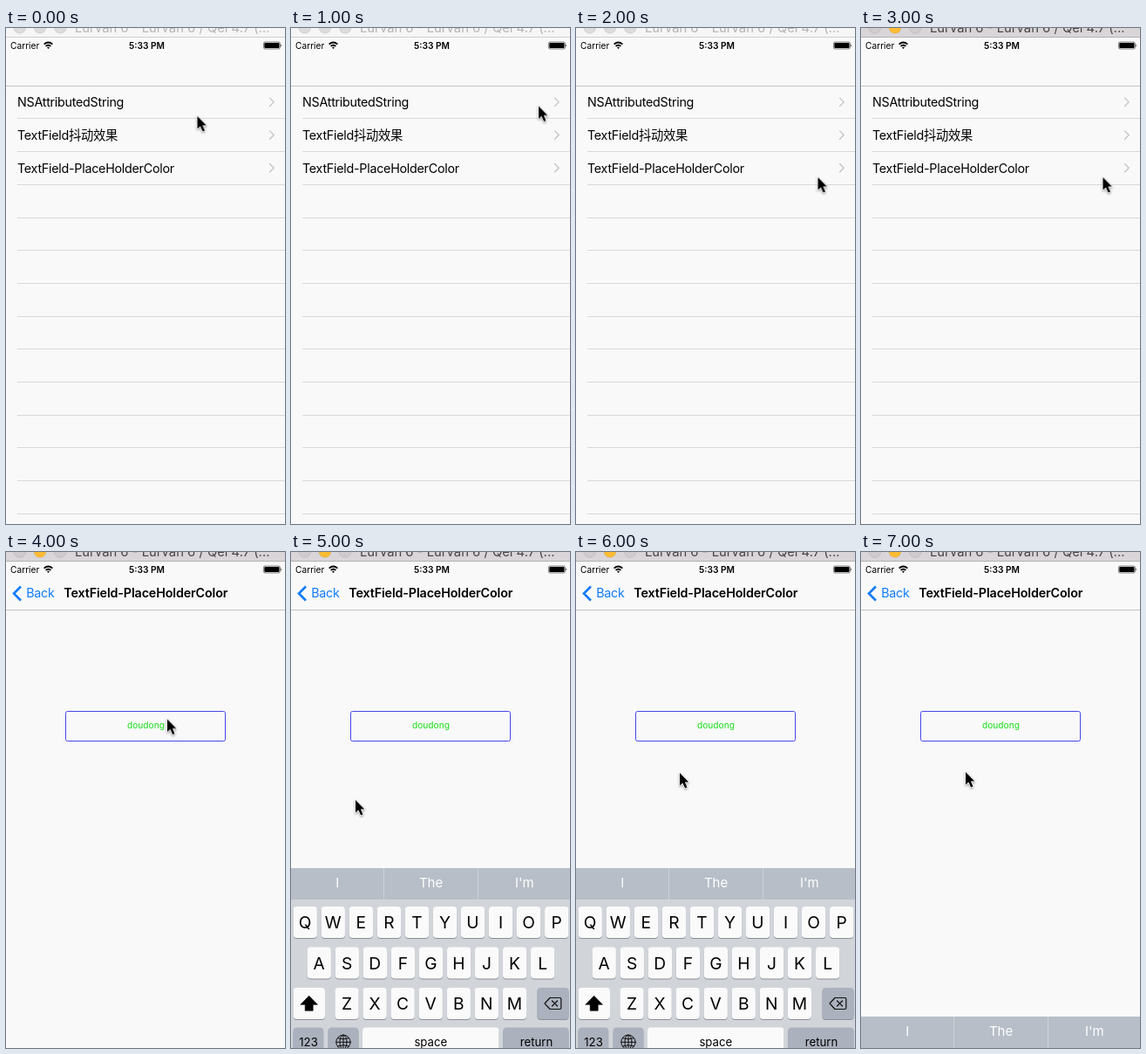
An HTML page for the animation above (8000 ms loop, 320 by 568 pixels).

```html
<!DOCTYPE html>
<html lang="en">
<head>
<meta charset="utf-8">
<title>Text field demo</title>
<style>
  html, body { margin: 0; width: 100%; height: 100%; overflow: hidden; background: #f9f9f9; }
  svg { display: block; width: 320px; height: 568px; }
  text { font: 14.3px Inter, "Noto Sans CJK SC", "Noto Sans CJK", sans-serif; letter-spacing: -.26px; }
  .mid { text-anchor: middle; }
  .small { font-size: 10.2px; letter-spacing: 0; }
  .bold { font-weight: 600; }
  .heading { letter-spacing: -.13px; }
  .caption { font-size: 14.8px; letter-spacing: 0; }
  .letter { font-size: 19.2px; letter-spacing: 0; }
  .label { font-size: 13.2px; letter-spacing: 0; }
  .hint { font-size: 15px; letter-spacing: 0; fill: #fff; }
  .line { fill: none; stroke-linecap: round; stroke-linejoin: round; }

  #list, #page, #idle, #active, #keys, #pointer { animation: 8s step-end infinite; }
  #list { animation-name: until-push; }
  #page { animation-name: after-push; }
  #idle { animation-name: until-focus; }
  #active { animation-name: after-focus; }
  #keys { animation-name: keyboard; }
  #pointer { animation-name: point; filter: drop-shadow(.5px 1.5px 1px #0006); }

  @keyframes until-push { 0% { visibility: visible; } 50%, 100% { visibility: hidden; } }
  @keyframes after-push { 0% { visibility: hidden; } 50%, 100% { visibility: visible; } }
  @keyframes until-focus { 0% { visibility: visible; } 37.5%, 100% { visibility: hidden; } }
  @keyframes after-focus { 0% { visibility: hidden; } 37.5%, 100% { visibility: visible; } }
  @keyframes keyboard {
    0% { transform: translateY(210px); }
    62.5% { transform: none; }
    87.5%, 100% { transform: translateY(170px); }
  }
  @keyframes point {
    0% { transform: translate(219.5px, 101px); }
    12.5% { transform: translate(284px, 89.5px); }
    25%, 37.5% { transform: translate(277.5px, 171px); }
    50% { transform: translate(185px, 191.5px); }
    62.5% { transform: translate(74px, 284px); }
    75% { transform: translate(119px, 253px); }
    87.5%, 100% { transform: translate(120px, 252px); }
  }
</style>
</head>
<body>
<svg viewBox="0 0 320 568">
  <rect width="320" height="568" fill="#f9f9f9"/>

  <g id="list"></g>

  <g id="page">
    <path class="line" d="M17 39.5 9 47.5 17 55.5" stroke="#107bfa" stroke-width="2.6" style="stroke-linecap:butt;stroke-linejoin:miter"/>
    <text x="23.2" y="52.3" fill="#107bfa">Back</text>
    <text class="mid bold heading" x="160.3" y="52.3">TextField-PlaceHolderColor</text>
    <rect x="68.5" y="182.5" width="183" height="34" rx="2" fill="#f9f9f9" stroke="#4646ea"/>
    <text class="mid small" x="160.5" y="202" fill="#18dc18">doudong</text>
  </g>

  <path d="M0 66.5H320" stroke="#c4c4c4"/>

  <text class="small" x="5" y="23.8">Carrier</text>
  <g class="line" stroke="#000" stroke-width="1.7" style="stroke-linecap:butt">
    <path d="M43.6 18.6Q48.5 14.4 53.4 18.6M45.6 20.9Q48.5 18.6 51.4 20.9"/>
    <path d="M48.5 24 47 22.3Q48.5 21 50 22.3Z" fill="#000" stroke="none"/>
  </g>
  <text class="mid small bold" x="161.5" y="23.8">5:33 PM</text>
  <rect x="295.4" y="16" width="19" height="8" rx="1.8" fill="none" stroke="#000" stroke-width=".5"/>
  <rect x="296.3" y="16.9" width="17.2" height="6.2" rx="1"/>
  <path d="M315.3 18.5Q317 20 315.3 21.5Z"/>

  <g id="idle"></g>
  <g id="active"></g>
  <g id="keys"></g>

  <g id="pointer">
    <path d="M0 0V14.6L3.4 11.5 6.1 17.6 8.5 16.6 5.9 10.6H10.3Z" stroke="#fff" stroke-width="1.6" stroke-linejoin="round" paint-order="stroke"/>
  </g>
</svg>
<script>
  const fill = (id, parts) => { document.getElementById(id).innerHTML = parts.join(""); };
  const text = (s, x, y, cls, extra = "") => `<text class="${cls}" x="${x}" y="${y}" ${extra}>${s}</text>`;
  const range = n => [...Array(n).keys()];

  // Table rows
  const rowY = i => 66.25 + 37.69 * i;
  fill("list", [
    ...range(13).map(i => `<path d="M13 ${Math.floor(rowY(i + 1)) + .5}H320" stroke="#d9d9d9"/>`),
    ...["NSAttributedString", "TextField抖动效果", "TextField-PlaceHolderColor"].map((s, i) => {
      const y = rowY(i) + 18.4;
      return text(s, 13, y + 5.6, "") +
        `<path class="line" d="M302.5 ${y - 4.5}l4.7 4.7-4.7 4.7" stroke="#c3c3c7" stroke-width="1.3"/>`;
    })
  ]);

  // Window title bar, unfocused and focused
  const titleBar = (back, edge, ink, dots) => [
    `<rect width="320" height="10.5" fill="${back}"/><path d="M0 10.5H320" stroke="${edge}"/>`,
    ...dots.map((c, i) => `<circle cx="${15.8 + 23.2 * i}" cy="-.8" r="7" fill="${c}" stroke="#0002" stroke-width=".6"/>`),
    text("Lurvan 6 - Lurvan 6 / Qel 4.7 (...", 79, 4.8, "caption", `fill="${ink}"`)
  ];
  fill("idle", titleBar("#f6f6f6", "#d0d0d0", "#b5b5b5", ["#dcdcdc", "#dcdcdc", "#dcdcdc"]));
  fill("active", titleBar("#d9d5d9", "#b3b0b3", "#474547", ["#cfcbcf", "#fdbc32", "#cfcbcf"]));

  // Keyboard
  const key = (x, y, w, color = "#fafafa") =>
    `<rect x="${x}" y="${y + 1}" width="${w}" height="36" rx="4" fill="#8b9097"/>` +
    `<rect x="${x}" y="${y}" width="${w}" height="36" rx="4" fill="${color}"/>`;
  const gray = "#abb1bd";
  const letters = (s, x0, y) => [...s].map((c, i) => {
    const x = x0 + 32.05 * i;
    return key(x, y, 27.3) + text(c, x + 13.6, y + 25.2, "letter mid");
  });
  fill("keys", [
    `<rect y="362" width="320" height="36" fill="#b7bec7"/>`,
    `<rect y="398" width="320" height="170" fill="#d1d5da"/>`,
    `<path d="M106.5 362V398M214.5 362V398" stroke="#cdd2d8"/>`,
    ...["I", "The", "I'm"].map((s, i) => text(s, 53.3 + 107.3 * i, 384.2, "hint mid")),
    ...letters("QWERTYUIOP", 2.6, 406),
    ...letters("ASDFGHJKL", 18.6, 452.5),
    ...letters("ZXCVBNM", 50.4, 499),
    key(2.6, 499, 36.4), key(282.5, 499, 36, gray),
    `<path d="M20.7 508.3 30.5 518.3H25.2V525.3H16.2V518.3H10.9Z" stroke="#000" stroke-width=".6" stroke-linejoin="round"/>`,
    `<path class="line" d="M291 517 297 510.5H308.3Q309.8 510.5 309.8 512V522Q309.8 523.5 308.3 523.5H297ZM299.5 514l6 6m0-6-6 6" stroke="#111" stroke-width="1.2"/>`,
    key(2.6, 544.5, 34.6, gray), key(42.6, 544.5, 34.8, gray),
    key(82, 544.5, 156.5), key(243.4, 544.5, 75, gray),
    text("123", 20, 566, "label mid"),
    text("space", 160.3, 565.5, "label mid"),
    text("return", 281.5, 565.5, "label mid"),
    `<g class="line" stroke="#111" stroke-width="1"><circle cx="60" cy="561.3" r="8.2"/><ellipse cx="60" cy="561.3" rx="4" ry="8.2"/>`,
    `<path d="M60 553.1V569.5M51.8 561.3H68.2M53.5 556.8Q60 559 66.5 556.8M53.5 565.8Q60 563.6 66.5 565.8"/></g>`
  ]);
</script>
</body>
</html>
```
